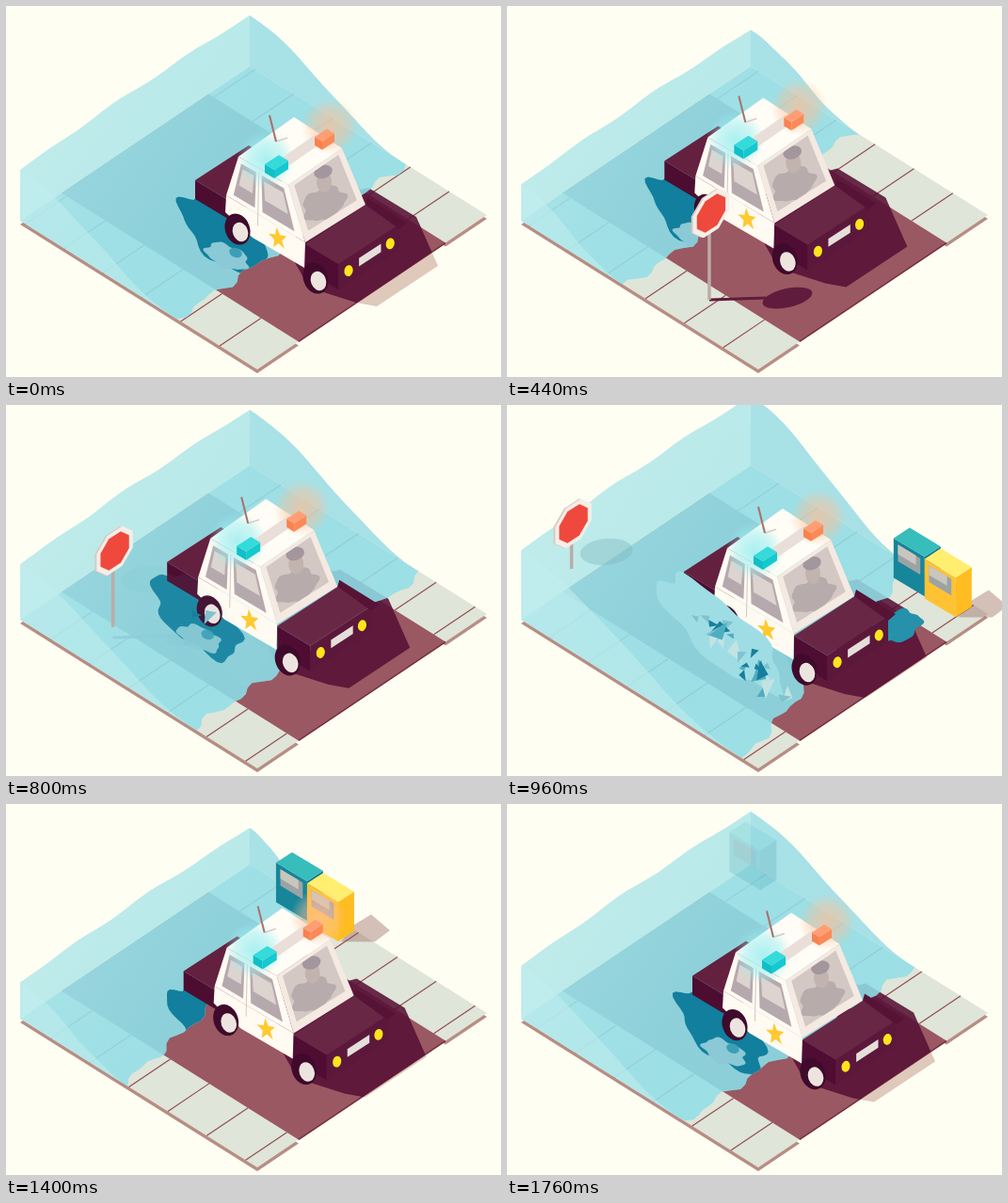
Animation of 526x394 px, one loop 1800 ms. Source, as an HTML page with a canvas:

```html
<!DOCTYPE html>
<html lang="en">
<head>
<meta charset="utf-8">
<title>Patrol car and wave</title>
<style>
html, body { margin: 0; width: 100%; height: 100%; overflow: hidden; background: #fffef3; }
canvas { display: block; width: 526px; height: 394px; }
</style>
</head>
<body>
<canvas id="stage" width="526" height="394"></canvas>
<script>
const ctx = document.getElementById('stage').getContext('2d');
const LOOP = 1800, STEP = 40, CURB = .18, TILE = 41.3, SPEED = .2815;
const ALONG = [1, .6], ACROSS = [1, -.65];
// time, reach of the water along the road, car offset
const POSES = [[0, .66, 0], [280, .54, -17], [600, .42, -44], [960, .94, -13],
  [1240, .63, 9], [1560, .34, -33], [1760, .69, -4]];

const { sin, cos, PI } = Math;
const clamp = v => Math.max(0, Math.min(1, v));
const ramp = (t, a, b) => clamp((t - a) / (b - a));
const mix = (a, b, k) => a + (b - a) * k;
const mixPt = (p, q, k) => [mix(p[0], q[0], k), mix(p[1], q[1], k)];
const move = (p, v, k = 1) => [p[0] + v[0] * k, p[1] + v[1] * k];
const range = (n, f) => Array.from({ length: n + 1 }, (_, i) => f(i / n));

// Smooth periodic curve through one column of the poses
function pose(col, t) {
  const n = POSES.length;
  const time = j => POSES[(j + n) % n][0] + LOOP * Math.floor(j / n);
  const val = j => POSES[(j + n) % n][col];
  const slope = j => (val(j + 1) - val(j - 1)) / (time(j + 1) - time(j - 1));
  let i = n - 1;
  while (time(i) > t) i--;
  const span = time(i + 1) - time(i), u = (t - time(i)) / span, w = 1 - u;
  return val(i) * (1 + 2 * u) * w * w + slope(i) * span * u * w * w
    + val(i + 1) * u * u * (3 - 2 * u) - slope(i + 1) * span * u * u * w;
}

// c runs across the road, d along it, z upwards
const at = (c, d, z = 0) => [15 + 252 * d + 244 * c, 228 + 158 * d - 164 * c - z];
const strip = (c0, c1) => [at(c0, 0), at(c1, 0), at(c1, 1), at(c0, 1)];

function trace(pts) {
  ctx.beginPath();
  pts.forEach(p => ctx.lineTo(p[0], p[1]));
  ctx.closePath();
}

function poly(pts, fill) {
  trace(pts);
  ctx.fillStyle = fill;
  ctx.fill();
}

function line(a, b, color, width = 1) {
  ctx.beginPath();
  ctx.moveTo(...a);
  ctx.lineTo(...b);
  ctx.strokeStyle = color;
  ctx.lineWidth = width;
  ctx.stroke();
}

function oval(x, y, rx, ry, fill, turn = 0) {
  ctx.beginPath();
  ctx.ellipse(x, y, rx, ry, turn, 0, 7);
  ctx.fillStyle = fill;
  ctx.fill();
}

function blob(x, y, rx, ry, turn, phase, fill) {
  poly(range(60, k => {
    const a = k * 2 * PI, r = 1 + .1 * sin(a * 5 + phase) + .05 * sin(a * 9 - phase);
    const u = rx * r * cos(a), v = ry * r * sin(a);
    return [x + u * cos(turn) - v * sin(turn), y + u * sin(turn) + v * cos(turn)];
  }), fill);
}

function glow(x, y, r, rgb, a) {
  const g = ctx.createRadialGradient(x, y, 0, x, y, r);
  g.addColorStop(0, `rgba(${rgb},${a})`);
  g.addColorStop(.6, `rgba(${rgb},${a * .6})`);
  g.addColorStop(1, `rgba(${rgb},0)`);
  oval(x, y, r, r, g);
}

function group(x, y, draw, alpha = 1) {
  ctx.save();
  ctx.translate(x, y);
  ctx.globalAlpha *= alpha;
  draw();
  ctx.restore();
}

function inside(pts, draw) {
  ctx.save();
  trace(pts);
  ctx.clip();
  draw();
  ctx.restore();
}

// A face maps u, v in 0..1 to its four corners, clockwise from top left
const face = (a, b, c, d) => (u, v) => mixPt(mixPt(a, b, u), mixPt(d, c, u), v);

function panel(f, fill, u0 = 0, v0 = 0, u1 = 1, v1 = 1) {
  poly([f(u0, v0), f(u1, v0), f(u1, v1), f(u0, v1)], fill);
}

// Block from its left top corner; returns the two visible sides
function prism(a, len, wide, high, [top, left, right]) {
  const b = move(a, ALONG, len), c = move(b, ACROSS, wide), d = move(a, ACROSS, wide);
  const low = p => move(p, [0, high]);
  const sides = [face(a, b, low(b), low(a)), face(b, c, low(c), low(b))];
  panel(sides[0], left);
  panel(sides[1], right);
  poly([a, b, c, d], top);
  return sides;
}

function ground(t) {
  for (const c of [0, 1 - CURB]) {
    poly(strip(c, c + CURB).map(p => move(p, [0, 4])), '#b78d84');
  }
  poly(strip(0, 1), '#dfe5d8');
  poly(strip(CURB, 1 - CURB), '#9a5862');
  line(at(CURB, 1), at(1 - CURB, 1), '#762c40', 1.5);
  const shift = 212 - 12 * TILE * t / LOOP;
  for (let x = (shift % TILE + TILE) % TILE; x < 250; x += TILE) {
    for (const c of [0, 1 - CURB]) line(at(c, x / 252), at(c + CURB, x / 252), '#914e53', 1.2);
  }
}

const boxDepth = t => .63 - SPEED * (t - 1240) / 252;

function makeWater(t) {
  const l = pose(1, t), w = t / LOOP * 2 * PI;
  // The boxes hold the water back on their side
  const boxed = t > 820 && t < 1600;
  const r = boxed ? Math.min(l, Math.max(.3, boxDepth(t) - .27)) : l;
  const high = 8 + 70 * l;
  const reach = c => mix(l, r, c) + .012 * sin(c * 34 + w * 3) + .008 * sin(c * 61 - w * 2);
  const height = (c, s) => (high + 3 * sin(PI * c) + 6 * c * (1 - c) * sin(c * 19 + w * 2))
    * (1 + cos(PI * s)) / 2 + 4 * s * (1 - s) * sin(s * 14 + c * 5 + w * 2);
  const back = range(30, c => at(c, 0, height(c, 0)));
  const side = c => range(24, s => at(c, reach(c) * s, height(c, s)));
  const shore = range(40, k => at(1 - k, reach(1 - k)));
  const right = side(1);
  return { reach: l, back, right, left: side(0), outline: [...back, ...right, ...shore, at(0, 0)] };
}

function water(w) {
  inside(w.outline, () => {
    poly(strip(0, 1), 'rgba(148,222,231,.87)');
    poly(strip(CURB, 1 - CURB), 'rgba(125,208,218,.35)');
    poly([at(0, 0), ...w.back, at(1, 0)], '#bdeae9');
    poly([at(1, 0), ...w.right, at(1, 1)], '#a9e1e6');
    const g = ctx.createLinearGradient(60, 130, 240, 260);
    g.addColorStop(0, 'rgba(195,238,238,.28)');
    g.addColorStop(1, 'rgba(140,220,228,.06)');
    poly(w.outline, g);
  });
  poly([at(0, 0), ...w.left], 'rgba(194,238,238,.58)');
}

function wake(phase) {
  blob(232, 243, 58, 27, .75, phase, '#117f9d');
  blob(235, 266, 24, 12, .4, phase, '#8ac9d5');
  oval(244, 262, 7, 5, '#3b9fb6', .4);
}

function flood(phase, amount) {
  group(0, 0, () => blob(240, 250, 85, 28, .74, phase, '#9fdde4'), amount);
  let seed = 83;
  const rnd = () => (seed = seed * 16807 % 2147483647) / 2147483647;
  const tones = ['#177f9c', '#7fc3cf', '#4fadc0', '#c3e3e3'];
  for (let i = 0; i < 26 * amount; i++) {
    const k = rnd(), x = 222 + 85 * k + 24 * (rnd() - .5), y = 234 + 80 * k + 24 * (rnd() - .5);
    const a = rnd() * 6, r = 4 + 9 * rnd();
    poly([0, 1.9, 3.3].map(q => [x + r * cos(a + q), y + r * sin(a + q)]), tones[i % 4]);
  }
}

function carShadow(fill) {
  poly([[300, 260], [300, 215], [385, 193], [436, 224], [459, 276], [394, 319], [372, 315], [322, 299]], fill);
}

function wheel(x, y) {
  oval(x - 3, y - 3, 13, 17, '#3f0a2b', -.35);
  oval(x, y, 8, 10.5, '#eee4df', -.35);
}

function car() {
  // Roof corners, then the belt line below them
  const back = [247, 160], front = [300, 190], farFront = [357, 151], farBack = [306, 118];
  const beltBack = [234, 201], beltFront = [318, 251], beltFar = [382, 211];
  const side = face(back, front, beltFront, beltBack);
  const roof = face(back, front, farFront, farBack);
  const screen = face(front, farFront, beltFar, beltFront);

  prism([201, 185], 35, 57, 20, ['#64203f', '#4c0d31', '#4c0d31']);
  poly([beltBack, beltFront, [317, 278], [262, 246], [233, 219]], '#fffaf2');
  panel(side, '#fffaf2');
  panel(roof, '#fffdf6');
  panel(screen, '#f4eae2');
  for (const [u0, u1] of [[.08, .36], [.46, .88]]) {
    panel(side, '#b5a9ae', u0, .12, u1, .9);
    panel(side, '#ddd4cf', u0 + .04, .22, u1 - .04, .62);
  }
  line(side(.41, .1), side(.4, 1.25), '#d4c7c2');

  panel(screen, '#d3c8c3', .09, .06, .91, .86);
  inside([screen(.09, .06), screen(.91, .06), screen(.91, .86), screen(.09, .86)], () => {
    blob(338, 210, 24, 17, -.5, 0, '#b7abac');
    oval(338, 187, 8, 11, '#c3b3ae');
    oval(337, 176, 10, 7, '#a3969d', -.3);
  });

  const [, nose] = prism([318, 253], 35, 65, 27, ['#692746', '#4f0d33', '#5c183a']);
  poly([beltFar, [384, 204], [426, 230], [418, 237]], '#571336');
  panel(nose, '#e5dfda', .34, .3, .7, .62);
  for (const u of [.17, .85]) oval(...nose(u, .53), 4.5, 6, '#ffe51c', .2);
  wheel(249, 240);
  wheel(332, 292);
  poly(range(10, k => {
    const a = k * 2 * PI - 1.7, r = Math.round(k * 10) % 2 ? 5 : 12;
    return [289 + r * .85 * cos(a), 247 + r * (sin(a) + .25 * cos(a))];
  }), '#ffc92f');

  glow(276, 163, 31, '155,238,241', .85);
  glow(344, 128, 30, '255,190,150', .72);
  panel(roof, '#e9dfd8', .5, .1, .7, .95);
  prism([275, 168], 10, 15, 9, ['#35dadb', '#10bfc7', '#14c9cf']);
  prism([328, 139], 8, 13, 9, ['#ff9e74', '#f9824f', '#fb8a58']);
  line([287, 144], [299, 140], '#dccac2', 1.5);
  line([287, 144], [280, 116], '#a8716c', 2);
}

function signShadow(color) {
  line([0, 0], [60, -2], color, 3);
  oval(83, -2, 27, 10, color, -.22);
}

function sign(length) {
  const octagon = (r, x) => range(7, k => {
    const a = (k * 7 + .5) * PI / 4;
    return [x + 20 * r * cos(a), -92 - 13 * r * cos(a) + 22 * r * sin(a)];
  });
  line([0, length - 76], [0, -76], '#bbaca8', 3.5);
  poly(octagon(1.04, 0), '#d9cac2');
  poly(octagon(1.04, 2), '#f6eee7');
  poly(octagon(.82, 2), '#ef493d');
}

function newsBox(tones) {
  const [left] = prism([0, 10], 33, 17, 42, tones);
  panel(left, '#9ba3a5', .14, .1, .86, .52);
  panel(left, '#c9c6bd', .14, .1, .72, .34);
}

function boxes(t, wet) {
  if (t < 800) return;
  const dt = Math.min(t, 1580) - 1240, sunk = ramp(t, 1580, 1700);
  group(365 - SPEED * dt, 103 - .18 * dt, () => {
    const teal = () => group(-33, -22, () => newsBox(['#36bdbc', '#17859a', '#0d738a']), 1 - .85 * sunk);
    group(0, 0, () => {
      poly([[36, 72], [50, 54], [68, 43], [88, 60], [72, 72]], 'rgba(139,82,79,.36)');
      group(0, 0, () => blob(-30, 82, 27, 16, -.3, 1, '#2591ab'), wet);
    }, 1 - sunk);
    teal();
    group(0, 0, () => newsBox(['#ffee70', '#ffc233', '#ffbd22']), 1 - sunk);
  }, ramp(t, 800, 860));
}

function draw(t) {
  const x = pose(2, t), y = x * .61, w = makeWater(t);
  const surge = ramp(w.reach, .72, .92), phase = t / LOOP * 8 * PI;
  ctx.fillStyle = '#fffef3';
  ctx.fillRect(0, 0, 526, 394);

  const dt = t - 280, sx = 260 - SPEED * dt, sy = 341 - .181 * dt;
  const seen = ramp(t, 130, 200) * (1 - ramp(t, 980, 1060)), sunk = ramp(t, 780, 860);
  const onSign = (f, alpha = 1) => group(sx, sy, f, seen * alpha);
  const shadows = (car, post) => {
    group(x, y, () => carShadow(car));
    onSign(() => signShadow(post), 1 - sunk);
  };

  shadows('#dec9bb', '#decbbd');
  ground(t);
  inside(strip(0, 1), () => shadows('rgba(87,17,53,.88)', '#5f1c3c'));
  water(w);
  onSign(() => oval(37, -62, 28, 14, 'rgba(123,181,186,.4)', -.1), sunk);
  inside(w.outline, () => group(x, y, () => wake(phase), 1 - surge));
  boxes(t, surge);
  group(x, y, car);
  inside(w.outline, () => group(x, y, () => flood(phase, surge)));
  onSign(() => sign(mix(76, 32, sunk)));
}

const start = performance.now();
function tick() {
  const t = (performance.now() - start) % LOOP;
  draw(Math.floor(t / STEP) * STEP);
  requestAnimationFrame(tick);
}
draw(0);
requestAnimationFrame(tick);
</script>
</body>
</html>
```
